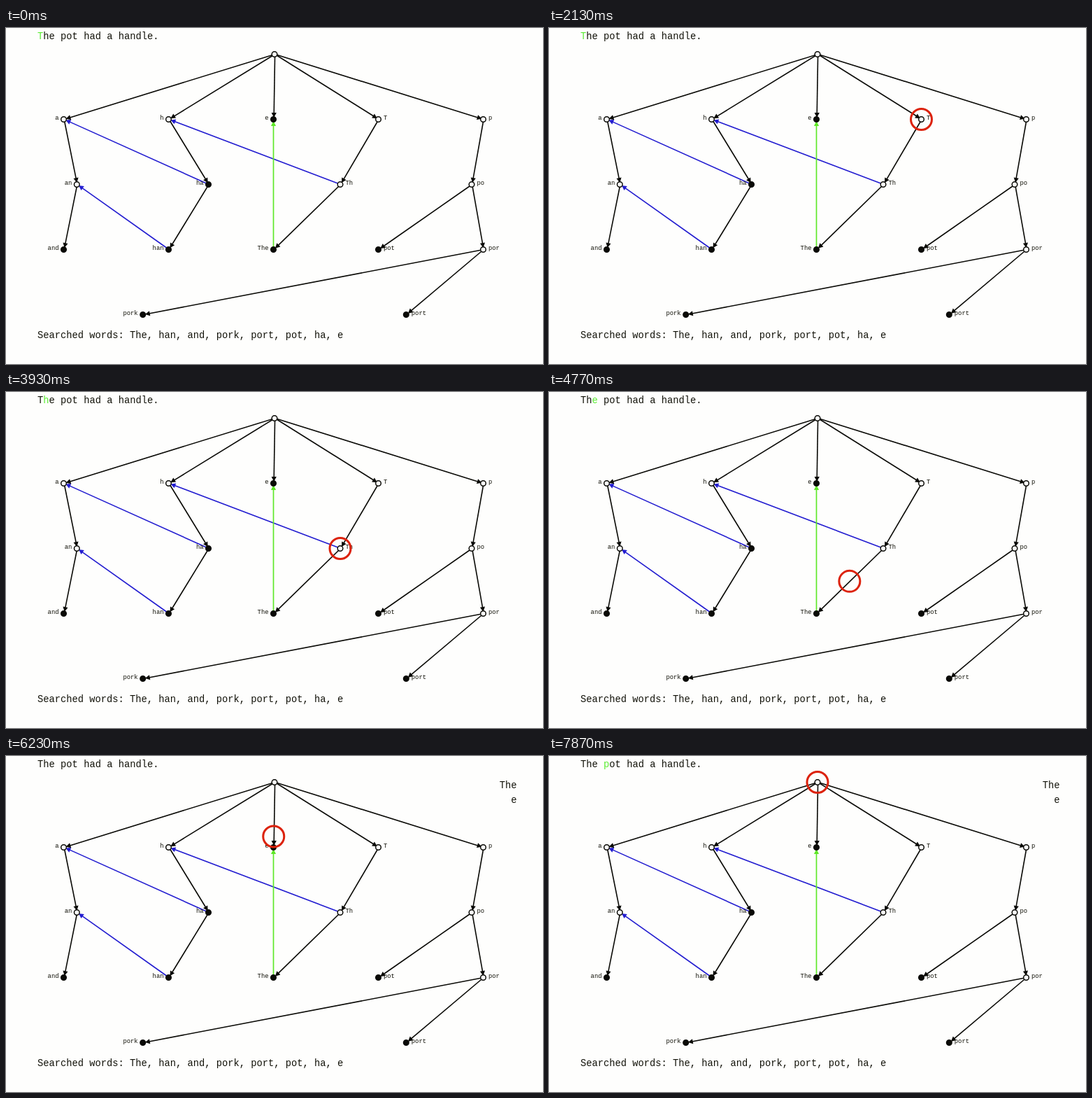
Recreate the animation shown at these times as an HTML page. Size 768 by 480 pixels, loop 8000 ms.

```html
<!DOCTYPE html>
<html lang="en">
<head>
<meta charset="utf-8">
<title>Word search automaton</title>
<style>
  html, body { margin: 0; width: 100%; height: 100%; overflow: hidden; background: #fefefd; }
  svg { display: block; width: 768px; height: 480px; }
  text { font-family: "Liberation Mono", "Courier New", monospace; font-size: 13.75px; fill: #111108; white-space: pre; }
  .label { font-size: 8.85px; }
</style>
</head>
<body>
<svg id="stage" viewBox="0 0 768 480"></svg>
<script>
const LOOP = 8000, STEP = 875;
const INK = '#0a0a06', GREEN = [90, 236, 50], DARK = [17, 17, 8];
const stage = document.getElementById('stage');

const nodes = {
  root: [384, 37.5],
  a: [82.5, 130.5], h: [232.5, 130.5], e: [382.5, 130.5, 1], T: [532.5, 130.5], p: [682.5, 130.5],
  an: [101.3, 223.5], ha: [289.5, 223.5, 1], Th: [478, 223.5], po: [666, 223.5],
  and: [82.5, 316.5, 1], han: [232.5, 316.5, 1], The: [382.5, 316.5, 1], pot: [532.5, 316.5, 1], por: [682.5, 316.5],
  pork: [195.7, 409.5, 1], port: [572.3, 409.5, 1]
};

function add(tag, attrs, content) {
  const el = document.createElementNS('http://www.w3.org/2000/svg', tag);
  for (const key in attrs) el.setAttribute(key, attrs[key]);
  if (content) el.textContent = content;
  return stage.appendChild(el);
}

function arrow(from, to, color, width, shift = 0) {
  const [x1, y1] = nodes[from], [x2, y2] = nodes[to];
  const len = Math.hypot(x2 - x1, y2 - y1);
  const ux = (x2 - x1) / len, uy = (y2 - y1) / len;
  const at = (back, side) => `${x2 + shift - ux * back - uy * side},${y2 - uy * back + ux * side}`;
  add('path', { d: `M${x1 + shift},${y1}L${at(7, 0)}`, stroke: color, 'stroke-width': width });
  add('path', { d: `M${at(2.5, 0)}L${at(9.5, 3.6)}L${at(9.5, -3.6)}Z`, fill: color });
}

for (const pair of ['ha a', 'Th h', 'han an']) arrow(...pair.split(' '), '#221cd0', 1.6, 0.6);
arrow('The', 'e', '#5fe828', 1.7);
for (const name in nodes) {
  if (name === 'root') continue;
  const parent = name.slice(0, -1) || 'root';
  arrow(parent, name, INK, 1.6, 0.6);
}
for (const name in nodes) {
  const [cx, cy, word] = nodes[name];
  add('circle', { cx, cy, r: 3.8, fill: word ? INK : '#fefefd', stroke: INK, 'stroke-width': 1.5 });
  if (name === 'root') continue;
  const left = cx < 384;
  add('text', {
    class: 'label', x: cx + (left ? -7 : 7.5), y: cy + 0.5, 'text-anchor': left ? 'end' : 'start'
  }, name);
}

const sentence = add('text', { x: 45, y: 15.5 });
const letters = [...'The pot had a handle.'].map(ch => {
  const span = document.createElementNS('http://www.w3.org/2000/svg', 'tspan');
  span.textContent = ch;
  return sentence.appendChild(span);
});
add('text', { x: 45, y: 443 }, 'Searched words: The, han, and, pork, port, pot, ha, e');
const found = [
  [add('text', { x: 730.5, y: 45.5, 'text-anchor': 'end' }, 'The'), 5203],
  [add('text', { x: 730.5, y: 67, 'text-anchor': 'end' }, 'e'), 6085]
];
const ring = add('circle', { r: 15, fill: 'none', stroke: '#dc220c', 'stroke-width': 3 });

const moves = [
  [870, 'T'], [2593, 'Th'], [4330, 'The'], [5203, 'e'], [6085, 'root']
];
// letter index, time it turns green, time it turns dark again
const marks = [[0, -200, 2330], [1, 2330, 4090], [2, 4090, 6085], [4, 7770, 9000]];

const ramp = (t, start, length) => Math.min(1, Math.max(0, (t - start) / length));

function draw(t) {
  let [x, y] = nodes.root;
  for (const [start, name] of moves) {
    const k = ramp(t, start, STEP), [tx, ty] = nodes[name];
    x += (tx - x) * k;
    y += (ty - y) * k;
  }
  ring.setAttribute('cx', x);
  ring.setAttribute('cy', y);
  ring.setAttribute('opacity', ramp(t, 30, 800));

  for (const [i, on, off] of marks) {
    const k = ramp(t, on, 100) - ramp(t, off, 100);
    const rgb = DARK.map((c, j) => Math.round(c + (GREEN[j] - c) * k));
    letters[i].style.fill = `rgb(${rgb})`;
  }
  for (const [el, start] of found) el.setAttribute('opacity', ramp(t, start, 100));
}

const began = performance.now();
function tick() {
  draw((performance.now() - began) % LOOP);
  requestAnimationFrame(tick);
}
draw(0);
requestAnimationFrame(tick);
</script>
</body>
</html>
```
